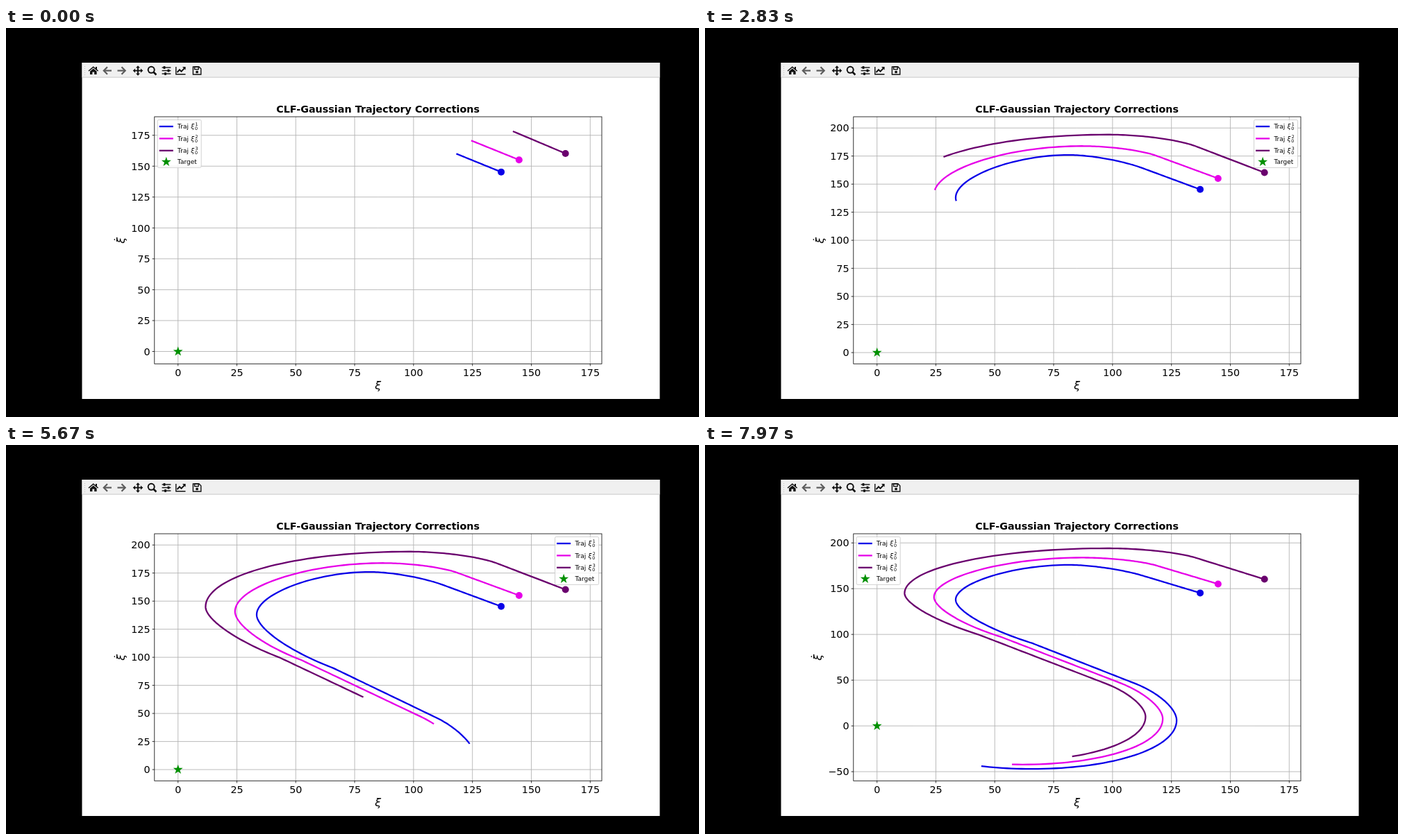
Write an HTML page with a canvas that moves like this. It is 998 by 561 pixels and loops after 8 s.

```html
<!DOCTYPE html>
<html lang="en">
<head>
<meta charset="utf-8">
<title>Trajectory corrections</title>
<style>
  html, body { margin: 0; width: 100%; height: 100%; overflow: hidden; background: #000; }
  canvas { display: block; }
</style>
</head>
<body>
<canvas id="stage" width="998" height="561"></canvas>
<script>
const ctx = document.getElementById('stage').getContext('2d');
const LOOP = 8000;
const FONT = '"DejaVu Sans", sans-serif';
const AXES = { left: 213.8, right: 858, top: 128, bottom: 484.3 };
const X_SCALE = 3.392;
const Y_SCALE = 1.62; // typical vertical scale, used to measure path lengths
const ROUND = 0.57;   // how far arc handles reach towards their corner
const toX = x => AXES.left + (x + 10) * X_SCALE;

// Point where the tangents through p and q cross.
function corner(p, slopeP, q, slopeQ) {
  const x = (q.y - p.y + slopeP * p.x - slopeQ * q.x) / (slopeP - slopeQ);
  const y = Math.abs(slopeP) < Math.abs(slopeQ)
    ? p.y + slopeP * (x - p.x)
    : q.y + slopeQ * (x - q.x);
  return { x, y };
}

const mix = (a, b, u) => ({ x: a.x + (b.x - a.x) * u, y: a.y + (b.y - a.y) * u });

function bezier(p, c1, c2, q, u) {
  const v = 1 - u;
  const blend = k => v * v * v * p[k] + 3 * v * v * u * c1[k] + 3 * v * u * u * c2[k] + u * u * u * q[k];
  return { x: blend('x'), y: blend('y') };
}

// Anchors are [x, y, time]: start, end of the first straight, top, left turn,
// second straight (both ends), right turn, bottom, next left turn.
function makeTrajectory(color, index, topRound, anchors) {
  const keys = anchors.map(([x, y, t]) => ({ x, y, t }));
  const slope = (a, b) => (b.y - a.y) / (b.x - a.x);
  const first = slope(keys[0], keys[1]), second = slope(keys[4], keys[5]);
  const steep = 1e6;
  const leaving = [first, first, 0, steep, second, second, steep, 0];
  const arriving = [first, 0, steep, -0.8, second, steep, 0, steep];
  const STEPS = 40;
  const samples = [keys[0]];

  for (let i = 0; i < keys.length - 1; i++) {
    const p = keys[i], q = keys[i + 1];
    const straight = leaving[i] === arriving[i];
    const c = straight ? mix(p, q, 0.5) : corner(p, leaving[i], q, arriving[i]);
    const round = i === 2 ? topRound : ROUND;
    const c1 = mix(p, c, round), c2 = mix(q, c, round);
    let cost = 0, last = p;
    const part = [];
    for (let k = 1; k <= STEPS; k++) {
      const point = bezier(p, c1, c2, q, k / STEPS);
      const dx = Math.abs(point.x - last.x) * X_SCALE;
      const length = Math.hypot(dx, (point.y - last.y) * Y_SCALE);
      // Motion is slower where the path runs vertically.
      cost += length / (0.35 + 0.65 * dx / length);
      part.push({ ...point, cost });
      last = point;
    }
    for (const s of part) samples.push({ x: s.x, y: s.y, t: p.t + (q.t - p.t) * s.cost / cost });
  }
  return { color, index, samples };
}

const trajectories = [
  makeTrajectory('#0a00e8', 1, 0.48, [
    [137.2, 145.3, -670], [112.8, 164.2, 190], [81.2, 176, 1290], [33.4, 138, 2745], [66, 90.3, 4055],
    [109.5, 46.4, 5150], [127.2, 6, 6050], [65.6, -47, 7590], [15.6, -12, 8690]
  ]),
  makeTrajectory('#e600e8', 2, 0.51, [
    [144.8, 155.1, -678], [118.7, 175.2, 195], [87, 183.9, 1150], [24.2, 140.8, 2930], [52.3, 97.6, 4075],
    [103, 47.2, 5505], [121.3, 7.7, 6370], [61.8, -42.2, 7890], [12, -8, 8990]
  ]),
  makeTrajectory('#6a006e', 3, 0.56, [
    [164.5, 160.3, -664], [135.5, 183.6, 200], [98, 194.1, 1200], [11.7, 145, 3500], [43, 99.9, 4630],
    [97, 46.4, 6205], [114, 10, 6950], [58, -38, 8490]
  ])
];

function visiblePart({ samples }, time) {
  const end = samples.findIndex(p => p.t > time);
  const a = samples[end - 1], b = samples[end];
  return [...samples.slice(0, end), mix(a, b, (time - a.t) / (b.t - a.t))];
}

function polyline(points, color, width) {
  ctx.beginPath();
  points.forEach(([x, y]) => ctx.lineTo(x, y));
  ctx.strokeStyle = color;
  ctx.lineWidth = width;
  ctx.stroke();
}

function polygon(points, color) {
  ctx.beginPath();
  points.forEach(([x, y]) => ctx.lineTo(x, y));
  ctx.fillStyle = color;
  ctx.fill();
}

function disc(x, y, r, color) {
  ctx.beginPath();
  ctx.arc(x, y, r, 0, 2 * Math.PI);
  ctx.fillStyle = color;
  ctx.fill();
}

function rect(x, y, w, h, color) {
  ctx.fillStyle = color;
  ctx.fillRect(x, y, w, h);
}

function text(str, x, y, size, align = 'left', style = '') {
  ctx.font = `${style} ${size}px ${FONT}`;
  ctx.textAlign = align;
  ctx.fillStyle = '#000';
  ctx.fillText(str, x, y);
}

function star(x, y) {
  polygon(Array.from({ length: 10 }, (_, i) => {
    const r = i % 2 ? 2.9 : 7.3, a = i * Math.PI / 5 - Math.PI / 2;
    return [x + r * Math.cos(a), y + r * Math.sin(a)];
  }), '#009000');
}

// Runs an icon drawing with the origin at its centre.
function icon(x, paint) {
  ctx.save();
  ctx.translate(x, 61.5);
  paint();
  ctx.restore();
}

function arrowIcon(dir) {
  polyline([[-5 * dir, 0], [6 * dir, 0]], '#5c5c5c', 2.2);
  polyline([[0, -5.3], [-5.2 * dir, 0], [0, 5.3]], '#5c5c5c', 2.2);
}

function drawToolbar() {
  const ink = '#111';
  rect(109.5, 50, 832, 21, '#f0f0f0');
  rect(109.5, 70.6, 832, 1, '#c8c8c8');
  for (let i = 0; i < 5; i++) rect(113, 55 + i * 3, 1, 1, '#c4c4c4');

  icon(125.8, () => {
    polyline([[-6.8, 0.5], [0, -5.3], [6.8, 0.5]], ink, 1.6);
    polygon([[-4.8, 1], [0, -3], [4.8, 1], [4.8, 5.5], [-4.8, 5.5]], ink);
    rect(3.2, -5.5, 2, 4, ink);
    rect(-1.4, 2, 2.8, 3.5, '#f0f0f0');
  });
  icon(146, () => arrowIcon(1));
  icon(166.5, () => arrowIcon(-1));
  icon(190, () => {
    for (let i = 0; i < 4; i++) {
      polyline([[0, 0], [5, 0]], ink, 1.9);
      polygon([[7.3, 0], [4, -3], [4, 3]], ink);
      ctx.rotate(Math.PI / 2);
    }
  });
  icon(210, () => {
    disc(-0.8, -1.2, 5.5, ink);
    disc(-0.8, -1.2, 3.5, '#f0f0f0');
    polyline([[2.4, 2], [6.4, 6]], ink, 2.6);
  });
  icon(231, () => [-3, 3, -1.5].forEach((knob, i) => {
    const y = (i - 1) * 4.5;
    polyline([[-6.4, y], [6.4, y]], ink, 1.4);
    rect(knob - 1.4, y - 1.9, 2.8, 3.8, ink);
  }));
  icon(251.5, () => {
    polyline([[-6.7, -5.5], [-6.7, 5.2], [7, 5.2]], ink, 1.4);
    polyline([[-5, 2.5], [-1.5, -1.3], [1, 1.1], [5.5, -3.5]], ink, 1.9);
    polygon([[2.5, -5.5], [7.1, -5.5], [7.1, -0.9]], ink);
  });
  icon(275, () => {
    polyline([[-5.6, -5.5], [3, -5.5], [5.8, -2.7], [5.8, 5.5], [-5.6, 5.5], [-5.6, -6.2]], ink, 1.4);
    ctx.strokeRect(-3.4, -5.5, 5.6, 3.6);
    disc(0.1, 1.9, 1.9, ink);
  });
}

function drawLegend(x) {
  ctx.beginPath();
  ctx.roundRect(x, 132.4, 63, 69, 1.8);
  ctx.fillStyle = 'rgba(255,255,255,0.8)';
  ctx.fill();
  ctx.strokeStyle = '#ccc';
  ctx.lineWidth = 0.9;
  ctx.stroke();
  for (const { color, index } of trajectories) {
    const y = 124.6 + index * 17.4;
    polyline([[x + 2.5, y], [x + 22.6, y]], color, 2.3);
    text('Traj', x + 28.8, y + 3.2, 9);
    text('ξ', x + 48, y + 3.2, 9, 'left', 'italic');
    text(index, x + 54.2, y - 0.6, 6.3);
    text('0', x + 53.7, y + 5.2, 6.3);
  }
  star(x + 12.6, 193);
  text('Target', x + 28.8, 196, 9);
}

function draw(time) {
  const curves = trajectories.map(tr => visiblePart(tr, time));
  const heights = curves.flat().map(p => p.y);
  const yMax = Math.ceil((Math.max(...heights) + 10) / 10) * 10;
  const yMin = Math.floor((Math.min(0, ...heights) - 10) / 10) * 10;
  const { left, right, top, bottom } = AXES;
  const toY = y => top + (yMax - y) * (bottom - top) / (yMax - yMin);
  const step = yMax - yMin > 225 ? 50 : 25;

  rect(0, 0, 998, 561, '#000');
  rect(109.5, 50, 832, 485, '#fff');
  drawToolbar();
  text('CLF-Gaussian Trajectory Corrections', 535.6, 122.3, 14.35, 'center', 'bold');

  for (let x = 0; x <= 175; x += 25) {
    const px = toX(x);
    polyline([[px, top], [px, bottom]], '#b4b4b4', 0.9);
    polyline([[px, bottom], [px, bottom + 3.2]], '#000', 0.8);
    text(x, px, 501.8, 14.35, 'center');
  }
  for (let y = Math.ceil(yMin / step) * step; y <= yMax; y += step) {
    const py = toY(y);
    polyline([[left, py], [right, py]], '#b4b4b4', 0.9);
    polyline([[left - 3.2, py], [left, py]], '#000', 0.8);
    text(String(y).replace('-', '−'), 207.6, py + 5.3, 14.35, 'right');
  }

  curves.forEach((curve, i) => {
    const { color } = trajectories[i];
    polyline(curve.map(p => [toX(p.x), toY(p.y)]), color, 2.3);
    disc(toX(curve[0].x), toY(curve[0].y), 5, color);
  });
  star(toX(0), toY(0));

  ctx.strokeStyle = '#000';
  ctx.lineWidth = 0.8;
  ctx.strokeRect(left, top, right - left, bottom - top);

  text('ξ', 535.8, 520.5, 16, 'center', 'italic');
  ctx.save();
  ctx.translate(yMin <= -50 ? 168 : 171, 306.3);
  ctx.rotate(-Math.PI / 2);
  text('ξ', 0, 0, 16, 'center', 'italic');
  disc(1.2, -14.6, 0.9, '#000');
  ctx.restore();

  // The legend sits on the right only while the purple line passes below it.
  drawLegend(toY(164) > 201.5 ? 790.6 : 218.2);
}

function tick() {
  draw(performance.now() % LOOP);
  requestAnimationFrame(tick);
}
tick();
</script>
</body>
</html>
```
